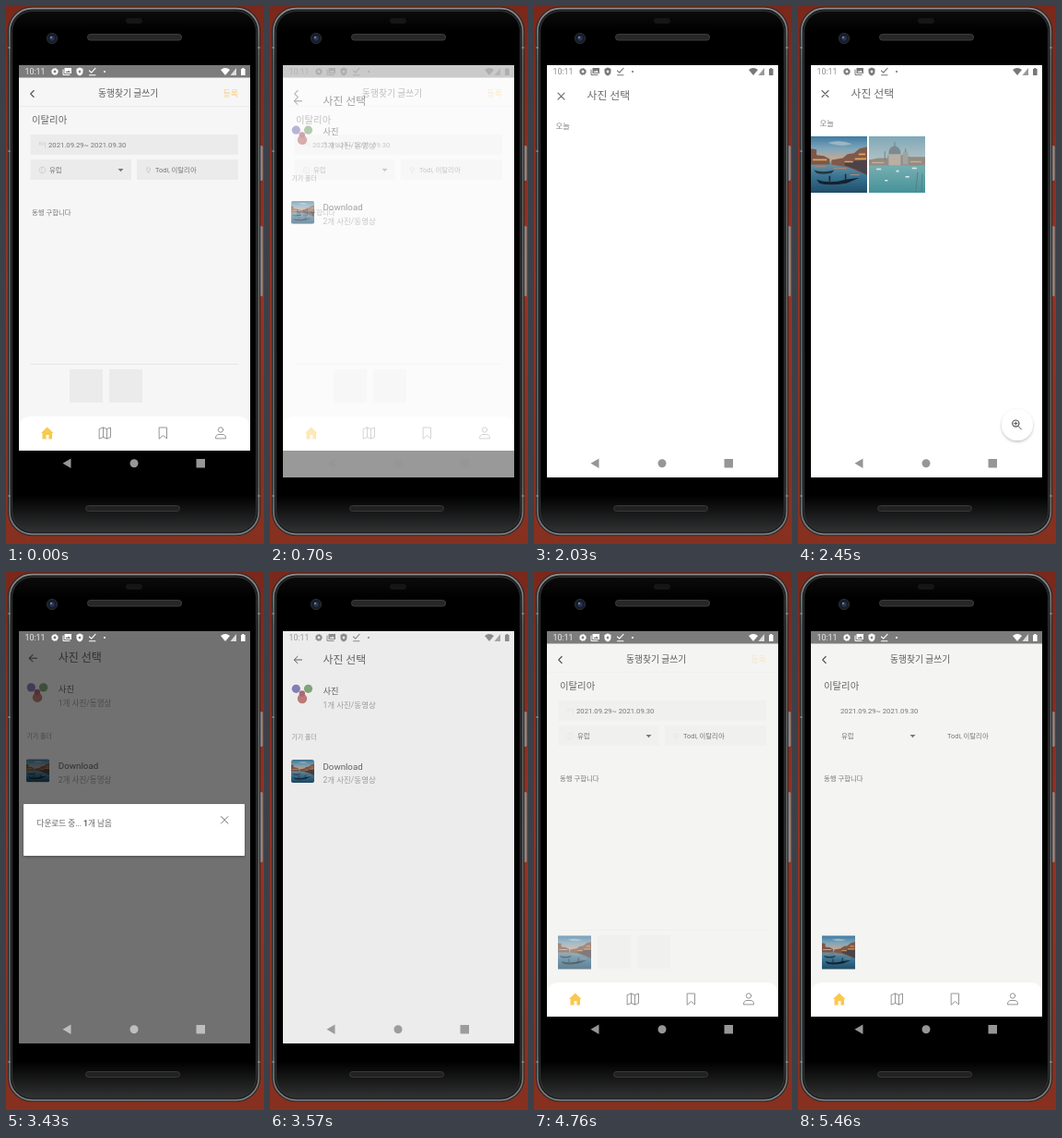
Recreate the animation shown at these times as an HTML page. Size 280 by 582 pixels, loop 5670 ms.

```html
<!DOCTYPE html>
<html lang="ko">
<head>
<meta charset="utf-8">
<title>동행찾기 글쓰기</title>
<style>
  html, body { margin: 0; width: 100%; height: 100%; overflow: hidden; background: #8a2d1d; }
  svg { display: block; }
  #stage { width: 280px; height: 582px; }
  text { font-family: Roboto, "Noto Sans CJK KR", "Noto Sans CJK", sans-serif; white-space: pre; }
  .line { fill: none; stroke: currentColor; stroke-linecap: round; stroke-linejoin: round; }
</style>
</head>
<body>
<svg id="stage" viewBox="0 0 280 582">
  <defs>
    <clipPath id="screen"><rect x="14" y="64" width="251" height="446"/></clipPath>
    <clipPath id="thumb"><rect x="23" y="203" width="25" height="25" rx="2.5"/></clipPath>
    <linearGradient id="wall" x2="0" y2="1">
      <stop offset="0" stop-color="#7a281b"/><stop offset=".5" stop-color="#983322"/><stop offset="1" stop-color="#86301f"/>
    </linearGradient>
    <linearGradient id="metal" x2="0" y2="1">
      <stop offset="0" stop-color="#8c8e8f"/><stop offset=".1" stop-color="#5e6061"/>
      <stop offset=".9" stop-color="#626465"/><stop offset="1" stop-color="#7c7e7f"/>
    </linearGradient>
    <linearGradient id="glass" x2="0" y2="1">
      <stop offset="0" stop-color="#0c0c0c"/><stop offset=".04" stop-color="#000"/>
      <stop offset=".93" stop-color="#000"/><stop offset="1" stop-color="#303132"/>
    </linearGradient>
    <linearGradient id="dusk" x2="0" y2="1">
      <stop offset="0" stop-color="#3f7ba1"/><stop offset=".22" stop-color="#7fa6bb"/><stop offset=".4" stop-color="#c4a995"/>
    </linearGradient>
    <linearGradient id="canal" x2="0" y2="1">
      <stop offset="0" stop-color="#7397a5"/><stop offset=".45" stop-color="#3b7594"/><stop offset="1" stop-color="#1f4d69"/>
    </linearGradient>
    <linearGradient id="haze" x2="0" y2="1">
      <stop offset="0" stop-color="#7fa9b8"/><stop offset=".5" stop-color="#b9c6c6"/>
    </linearGradient>
    <linearGradient id="lagoon" x2="0" y2="1">
      <stop offset="0" stop-color="#77aeb2"/><stop offset="1" stop-color="#459299"/>
    </linearGradient>
    <filter id="soft" x="-30%" y="-30%" width="160%" height="170%">
      <feDropShadow dx="0" dy="1.5" stdDeviation="1.6" flood-opacity=".26"/>
    </filter>

    <symbol id="evening" viewBox="0 0 60 60">
      <rect width="60" height="60" fill="url(#dusk)"/>
      <path d="M18 7Q30 3 44 8Q32 12 18 7z" fill="#9bb6c3"/>
      <rect y="27" width="60" height="33" fill="url(#canal)"/>
      <path d="M0 13L6 14V20L14 21L20 24V30H0z" fill="#7d5748"/>
      <path d="M60 11L52 13L46 18L39 19L34 23L22 25V30L40 33L60 41z" fill="#80594a"/>
      <path d="M60 25L48 26L36 27V31L47 35L60 41z" fill="#4c4348"/>
      <path d="M2 25H17M36 27H45M47 24H59M51 19H58" stroke="#e2a35d" stroke-width="1.6"/>
      <path d="M4 32H16M24 34H38M42 41H52" stroke="#a48672" stroke-width="1.2"/>
      <path d="M3 36Q13 39 25 36L22 39Q12 41 6 39z" fill="#26343f"/>
      <path d="M6 46Q20 51 37 46L52 44L38 50Q18 53 9 50z" fill="#15212c"/>
      <path d="M20 48V42M37 47V40" stroke="#202a33" stroke-width="1.6"/>
    </symbol>

    <symbol id="day" viewBox="0 0 60 60">
      <rect width="60" height="60" fill="url(#haze)"/>
      <path d="M0 25L10 23H20V20H36L44 22H60V32H0z" fill="#948b82"/>
      <path d="M21 31V20Q21 12 27 10Q34 12 34 20V31z" fill="#b5b0a8"/>
      <path d="M21 19Q21 11 27 10Q34 11 34 19z" fill="#7d8b90"/>
      <path d="M36 30V20Q36 16 39 15Q42 16 42 20V30z" fill="#9fa3a1"/>
      <path d="M27.5 6V11M39 13V16M17 16V25" stroke="#75838a"/>
      <path d="M3 28H16M23 26H32M44 27H56" stroke="#c4ad95" stroke-width="1.6"/>
      <rect y="31" width="60" height="29" fill="url(#lagoon)"/>
      <path d="M8 35H13M29 37H32M46 34H51M39 43H43M17 47H20" stroke="#e0ebe9" stroke-width="1.5"/>
      <path d="M50 59L52 38M56 59L57 40" stroke="#587b80" stroke-width=".9"/>
    </symbol>
  </defs>

  <!-- phone body -->
  <rect width="280" height="582" fill="url(#wall)"/>
  <rect x="274" y="151" width="4.6" height="38" rx="1.5" fill="#8b8d8e"/>
  <rect x="274" y="238" width="4.6" height="76" rx="1.5" fill="#8b8d8e"/>
  <rect x="2" y=".8" width="274.2" height="572.4" rx="26" fill="#27292a"/>
  <rect x="3.9" y="2.6" width="270.4" height="568.8" rx="24.5" fill="#1a1b1c" stroke="url(#metal)" stroke-width="1.7"/>
  <rect x="6.6" y="5.4" width="265" height="563.2" rx="22" fill="url(#glass)" stroke="#333536" stroke-width="1"/>
  <path d="M2 45H5M273 45H276M2 157H5M2 530H5M273 530H276" stroke="#999" stroke-width="1.2"/>
  <rect x="130" y="13" width="18" height="6" rx="3" fill="#161616"/>
  <rect x="88.5" y="30.5" width="102" height="6.5" rx="3" fill="#272727" stroke="#3d3d3d"/>
  <rect x="86.5" y="540.5" width="102" height="6" rx="3" fill="#222" stroke="#383838"/>
  <circle cx="50" cy="35" r="5.6" fill="#181c24" stroke="#2a2e33"/>
  <circle cx="50" cy="35" r="2.7" fill="#25375a"/>
  <circle cx="49" cy="34" r="1" fill="#7d9dc6"/>

  <g clip-path="url(#screen)">
    <!-- post form -->
    <g>
      <rect x="14" y="64" width="251" height="417" fill="#f6f6f6" id="paper"/>
      <rect x="14" y="64" width="251" height="13.5" fill="#7c7c7c"/>
      <path id="bar" d="M14 108.5H265" stroke="#ebebeb"/>
      <path class="line" d="M30.2 91.5L26.7 95L30.2 98.5" color="#555" stroke-width="1.1"/>
      <g id="fields">
        <path d="M26.5 139H252V161H26.5zM26.5 166H136V188H26.5zM142 166H252V188H142z" fill="#ebebeb"/>
        <path d="M27 387.5H252" stroke="#e6e6e6"/>
        <path d="M69 393H105V429H69zM112 393H148V429H112z" fill="#ebebeb"/>
        <path class="line" d="M36.5 148H42.5V153.5M36.5 148V150H41" color="#ccc" stroke-width=".7"/>
        <circle class="line" cx="39.5" cy="177.5" r="3.4" color="#ccc" stroke-width=".7"/>
        <path class="line" d="M39.5 174Q37.5 177.5 39.5 181" color="#ccc" stroke-width=".6"/>
        <path class="line" d="M154.5 180Q151.5 177 152.8 175.5Q154.5 174 156.2 175.5Q157.5 177 154.5 180z" color="#c2c2c2" stroke-width=".8"/>
        <text x="235.5" y="98" font-size="9" fill="#f5cf7c">등록</text>
      </g>
      <rect id="slot" x="26" y="393" width="36" height="36.5" fill="#ebebeb"/>
      <text x="100" y="98.3" font-size="9.75" fill="#5c5c5c">동행찾기 글쓰기</text>
      <text x="28" y="126.8" font-size="10.4" fill="#666">이탈리아</text>
      <g fill="#777" font-size="7.4">
        <text x="46" y="152.8" font-size="7.7">2021.09.29~ 2021.09.30</text>
        <text x="47" y="180">유럽</text>
        <text x="162" y="180">Todi, 이탈리아</text>
        <text x="28" y="226">동행 구합니다</text>
      </g>
      <path d="M121.5 176H127.5L124.5 179.2z" fill="#777"/>
      <rect id="caret" x="43.4" y="218" width="1" height="11" fill="#333"/>
      <use id="picked" href="#evening" x="26" y="393" width="36" height="37"/>
      <path d="M14 481V458Q14 444 28 444H251Q265 444 265 458V481z" fill="#fff"/>
      <path d="M38 462L44.7 455.5L51.5 462H50V468.5H39.5V462z" fill="#f9c84f"/>
      <path d="M43.5 468.5V464H46.5V468.5z" fill="#fff"/>
      <g class="line" color="#8a8a8a" stroke-width=".9">
        <path d="M101.5 457.5L105.5 456L109.5 457.5L113.5 456V466.5L109.5 468L105.5 466.5L101.5 468zM105.5 456V466.5M109.5 457.5V468"/>
        <path d="M166.5 456H174.5V468L170.5 464.5L166.5 468z"/>
        <circle cx="233" cy="458.5" r="2.7"/>
        <path d="M227.5 467.5Q227.5 463.5 231 463.5H235Q238.5 463.5 238.5 467.5z"/>
      </g>
      <rect x="14" y="481" width="251" height="29" fill="#000"/>
    </g>

    <!-- folder list -->
    <g id="list">
      <rect x="14" y="64" width="251" height="446" fill="#fff"/>
      <g id="listBody">
        <path class="line" d="M34.5 95H26.5M30 91.3L26.2 95L30 98.7" color="#666" stroke-width="1"/>
        <text x="57.5" y="98.8" font-size="11.9" fill="#6a6a6a">사진 선택</text>
        <circle cx="35" cy="137" r="5.2" fill="#c98580"/>
        <circle cx="28.3" cy="126.3" r="4.6" fill="#8d88c2"/>
        <circle cx="41.5" cy="126.3" r="4.6" fill="#8bb082"/>
        <circle cx="34.8" cy="131.5" r="3.2" fill="#bb6f82"/>
        <text x="57.5" y="131.6" font-size="9.3" fill="#6a6a6a">사진</text>
        <text x="57.5" y="146.6" font-size="8.5" fill="#a8a8a8">1개 사진/동영상</text>
        <text x="23.5" y="181" font-size="6.9" fill="#a0a0a0">기기 폴더</text>
        <g clip-path="url(#thumb)"><use href="#evening" x="23" y="203" width="25" height="25"/></g>
        <text x="57.5" y="213.6" font-size="9.7" fill="#6a6a6a">Download</text>
        <text x="57.5" y="228.4" font-size="8.5" fill="#a8a8a8">2개 사진/동영상</text>
      </g>
      <g id="toast">
        <rect x="18.5" y="446" width="241" height="29" rx="2" fill="#26292c"/>
        <text x="33" y="463.6" font-size="8.5" font-weight="500" fill="#f2f2f2">tavomi382@example.com(으)로 로그인했습니다.</text>
      </g>
    </g>

    <!-- photo grid -->
    <g id="grid">
      <rect x="14" y="64" width="251" height="446" fill="#fff"/>
      <g id="gridBody">
        <path class="line" d="M26 91.5L33 98.5M33 91.5L26 98.5" color="#666" stroke-width="1.1"/>
        <text x="57.5" y="98.8" font-size="11.9" fill="#6a6a6a">사진 선택</text>
        <text x="23.5" y="130" font-size="8.4" fill="#888">오늘</text>
        <g id="photos">
          <use href="#evening" x="14" y="141" width="61" height="61"/>
          <use href="#day" x="77" y="141" width="61" height="61"/>
        </g>
      </g>
      <g id="zoom">
        <circle cx="238" cy="453" r="17" fill="#fff" filter="url(#soft)"/>
        <g class="line" color="#555" stroke-width="1.2">
          <circle cx="236.3" cy="451.6" r="3.6"/>
          <path d="M239 454.4L242.5 458M234.7 451.6H237.9M236.3 450V453.2" stroke-width="1"/>
        </g>
      </g>
    </g>

    <rect id="dim" x="14" y="64" width="251" height="446" fill="#000"/>
    <g id="dialog">
      <rect x="19" y="251" width="240" height="56" rx="1" fill="#fff" filter="url(#soft)"/>
      <text x="33.5" y="275" font-size="8.6" fill="#666">다운로드 중... <tspan font-weight="700">1</tspan>개 남음</text>
      <path class="line" d="M233.5 264.5L241 272M241 264.5L233.5 272" color="#777"/>
    </g>

    <!-- system bars -->
    <g id="status" fill="currentColor">
      <text x="20.5" y="74.2" font-size="8.8" opacity=".85">10:11</text>
      <circle class="line" cx="53" cy="71" r="2.3" stroke-width="1.7"/>
      <circle class="line" cx="53" cy="71" r="3.4" stroke-width="1" stroke-dasharray="1 1.67"/>
      <path class="line" d="M62 69V74.5H69" stroke-width="1"/>
      <path d="M63.5 67H71V73H63.5zM64.5 72H70L68 69.5L66.7 71L65.8 70.2z" fill-rule="evenodd"/>
      <path d="M80 66.5L83.5 68V71Q83.5 74 80 75.5Q76.5 74 76.5 71V68zM80 69.2L78.4 71L80 72.8L81.6 71z" fill-rule="evenodd"/>
      <path class="line" d="M90.5 70L92.7 72.2L97 67.4M90.5 74.7H97" stroke-width="1.1"/>
      <circle cx="107" cy="71" r="1.1"/>
      <path d="M233 69Q238 65 243 69L238 75z"/>
      <path d="M250 67V75H243.5z" opacity=".75"/>
      <path d="M255 68H256.3V67H258.3V68H259.6V75H255z"/>
    </g>
    <g id="keys" fill="currentColor">
      <path d="M61.5 494.8L70.5 489.5V500z"/>
      <circle cx="139" cy="494.8" r="4.5"/>
      <rect x="206.5" y="490" width="9.5" height="9.5"/>
    </g>
  </g>
</svg>

<script>
const LOOP = 5670, TICK = 70;
const $ = id => document.getElementById(id);

// each track: [time, value] pairs, linear in between
const tracks = {
  list:   [[490, 0], [840, 1], [3850, 1], [4130, 0]],
  rise:   [[490, 1], [980, 0], [3850, 0], [4130, .7]],
  toast:  [[770, 0], [980, 1], [1680, 1], [1960, 0]],
  grid:   [[1610, 0], [2030, 1], [3220, 1], [3430, 0]],
  slide:  [[1610, 1], [2240, 0]],
  photos: [[2030, 0], [2240, .8], [2450, 1]],
  zoom:   [[2170, 0], [2450, 1]],
  dim:    [[3220, 0], [3430, .555], [3500, .4], [3570, .075], [3640, 0]],
  dialog: [[3220, 0], [3430, 1], [3500, .6], [3570, 0]],
  grow:   [[3220, 0], [3430, 1], [3570, 0]],
  slot:   [[3780, 0], [3850, 1], [4830, 1], [4900, 0]],
  fields: [[4480, 1], [4900, 0]],
  picked: [[4480, 0], [4900, 1]]
};

function at(name, t) {
  const keys = tracks[name];
  let prev = keys[0];
  for (const key of keys) {
    if (t < key[0]) {
      if (key === prev) return key[1];
      return prev[1] + (key[1] - prev[1]) * (t - prev[0]) / (key[0] - prev[0]);
    }
    prev = key;
  }
  return prev[1];
}

const gray = v => `rgb(${v},${v},${v})`;
const mix = (a, b, k) => Math.round(a + (b - a) * k);
const faded = ["list", "toast", "grid", "photos", "zoom", "dim", "dialog", "slot", "fields", "picked"];

function draw(t) {
  for (const name of faded) $(name).style.opacity = at(name, t);

  const scale = 1 + .009 * at("grow", t);
  const lift = 24 * at("rise", t) ** 2;
  $("listBody").setAttribute("transform",
    `translate(140 ${287 + lift}) scale(${scale}) translate(-140 -287)`);
  $("toast").setAttribute("transform", `translate(0 ${30 * (1 - at("toast", t))})`);
  $("gridBody").setAttribute("transform", `translate(0 ${24 * at("slide", t) ** 2})`);

  const caret = t >= 3920 && t < 4410 || t >= 4900 && t < 5460;
  $("caret").style.opacity = caret ? 1 : 0;

  const plain = at("fields", t);
  $("bar").style.opacity = plain;
  $("paper").setAttribute("fill", plain < .5 ? "#f4f4f2" : "#f6f6f6");

  const shade = Math.min(1, at("dim", t) / .5);
  $("status").style.color = gray(mix(mix(255, 120, at("list", t)), 255, shade));
  $("keys").style.color = gray(mix(150, 190, shade));
}

function loop(now) {
  draw(Math.floor(now % LOOP / TICK) * TICK);
  requestAnimationFrame(loop);
}
draw(0);
requestAnimationFrame(loop);
</script>
</body>
</html>
```
